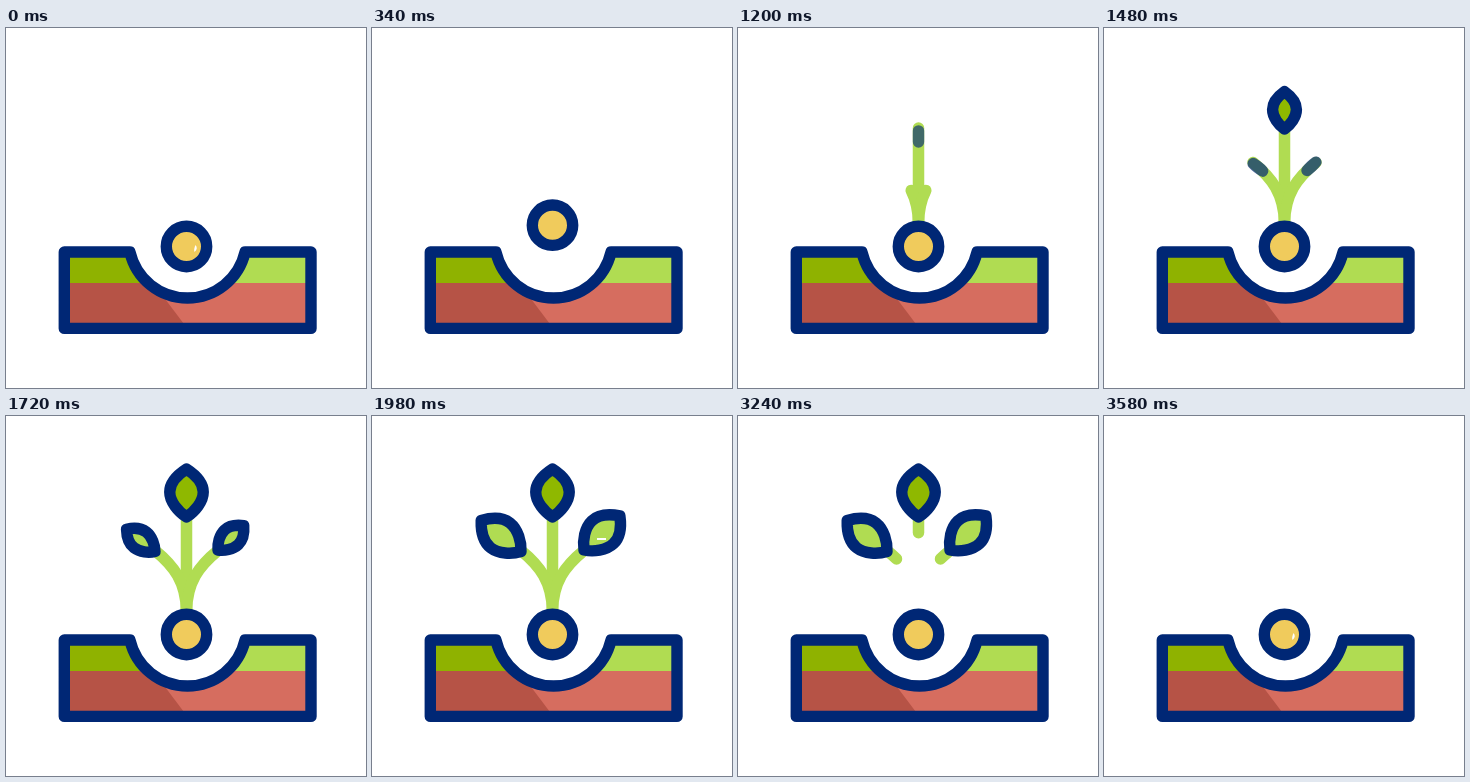
These frames come from a looping animation (360 px wide and 360 px high, 3600 ms). An HTML page:

```html
<!DOCTYPE html>
<html lang="en">
<head>
<meta charset="utf-8">
<title>Sprouting seed</title>
<style>
html, body { margin: 0; width: 100%; height: 100%; overflow: hidden; background: #fff; }
svg { display: block; width: 100vw; height: 100vh; }
.ink { stroke: #002775; stroke-width: 11.4; stroke-linejoin: round; stroke-linecap: round; }
.stem { fill: none; stroke: #b0dc52; stroke-width: 11.5; stroke-linecap: round; }
</style>
</head>
<body>
<svg viewBox="0 0 360 360">
  <clipPath id="clip"><path class="edge"/></clipPath>
  <g clip-path="url(#clip)">
    <path fill="#8fb200" d="M58 200H180V255H58z"/>
    <path fill="#b0dc52" d="M180 200H306V255H180z"/>
    <path fill="#d66d5f" d="M58 255H306V302H58z"/>
    <path fill="#b65346" d="M58 255H147L181 300H58z"/>
  </g>
  <path class="edge ink" fill="none"/>
  <path class="stem" pathLength="1" d="M180.5 195V100"/>
  <path class="stem" pathLength="1" d="M180.5 195C180 166 168 150 149 134.5"/>
  <path class="stem" pathLength="1" d="M180.5 195C181 166 193 150 212 134.5"/>
  <path class="leaf ink" fill="#8fb800"/>
  <path class="leaf ink" fill="#b0dc52"/>
  <path class="leaf ink" fill="#b0dc52"/>
  <path id="dash" fill="#fff" d="M225 122H234V124H225z"/>
  <g id="seed">
    <circle class="ink" r="20.2" fill="#f0cb5c"/>
    <path id="glint" fill="#fff" d="M9 -1.5Q12 2 8 5.5Q7 3 9 -1.5z"/>
  </g>
</svg>
<script>
const LOOP = 3600;
const all = s => [...document.querySelectorAll(s)];
const edges = all('.edge'), stems = all('.stem'), leaves = all('.leaf');
const seed = document.getElementById('seed');
const glint = document.getElementById('glint'), dash = document.getElementById('dash');

// base x, base y, rotation, length, width, start time
const leafData = [
  [180.5, 101, 0, 48, 33.5, 1200],
  [149, 135.5, -52, 50.5, 31.5, 1470],
  [212, 134, 46.5, 49.5, 31.5, 1470]
];
const stemTimes = [[840, 1190], [1040, 1380], [1040, 1380]];

const part = (t, a, b) => Math.min(1, Math.max(0, (t - a) / (b - a)));
const mix = (a, b, p) => a + (b - a) * p;
const smooth = p => p * p * (3 - 2 * p);

// Eased value through [time, value] keys
function track(t, keys) {
  let v = keys[0][1];
  for (let i = 1; i < keys.length; i++)
    v = mix(v, keys[i][1], smooth(part(t, keys[i - 1][0], keys[i][0])));
  return v;
}

function groundPath(top) {
  const r = 59, half = Math.sqrt(r * r - (top - 211) ** 2);
  return `M58.3 ${top}H${181.5 - half}A${r} ${r} 0 0 0 ${181.5 + half} ${top}H305V300.4H58.3z`;
}

// Closed outline: up the left side, down the right
function leafPath(h, w) {
  const x = w / 2;
  return `M0 0C${-x * .5} ${-h * .11} ${-x} ${-h * .32} ${-x} ${-h * .52}` +
    `C${-x} ${-h * .71} ${-x * .53} ${-h * .88} 0 ${-h}` +
    `C${x * .53} ${-h * .88} ${x} ${-h * .71} ${x} ${-h * .52}` +
    `C${x} ${-h * .32} ${x * .5} ${-h * .11} 0 0z`;
}

function draw(t) {
  const top = track(t, [[420, 224], [620, 231], [860, 224]]);
  edges.forEach(e => e.setAttribute('d', groundPath(top)));

  const y = track(t, [[0, 218.5], [280, 194], [570, 222], [660, 221.5], [860, 218.5]]);
  seed.setAttribute('transform', `translate(180.5 ${y})`);

  const cut = part(t, 2920, 3310);
  stems.forEach((s, i) => {
    const len = part(t, ...stemTimes[i]) - cut;
    s.style.display = len > 0 ? '' : 'none';
    s.style.strokeDasharray = `${Math.max(0, len)} 2`;
    s.style.strokeDashoffset = -cut;
  });

  const fade = 1 - part(t, 3380, 3560);
  leaves.forEach((l, i) => {
    const [x, y, turn, length, width, start] = leafData[i];
    const grow = part(t, start, start + 395);
    const slip = mix(13, 0, part(t, start, start + 200));
    l.setAttribute('d', leafPath(mix(11, length, grow), width * grow));
    l.setAttribute('transform', `translate(${x} ${y}) rotate(${turn}) translate(0 ${slip})`);
    l.setAttribute('opacity', part(t, start - 100, start + 60) * fade);
  });

  glint.style.display = t < 20 || t >= 3560 ? '' : 'none';
  dash.style.display = t >= 1980 && t < 2920 ? '' : 'none';
}

const begin = performance.now();
function tick() {
  draw((performance.now() - begin) % LOOP);
  requestAnimationFrame(tick);
}
tick();
</script>
</body>
</html>
```
